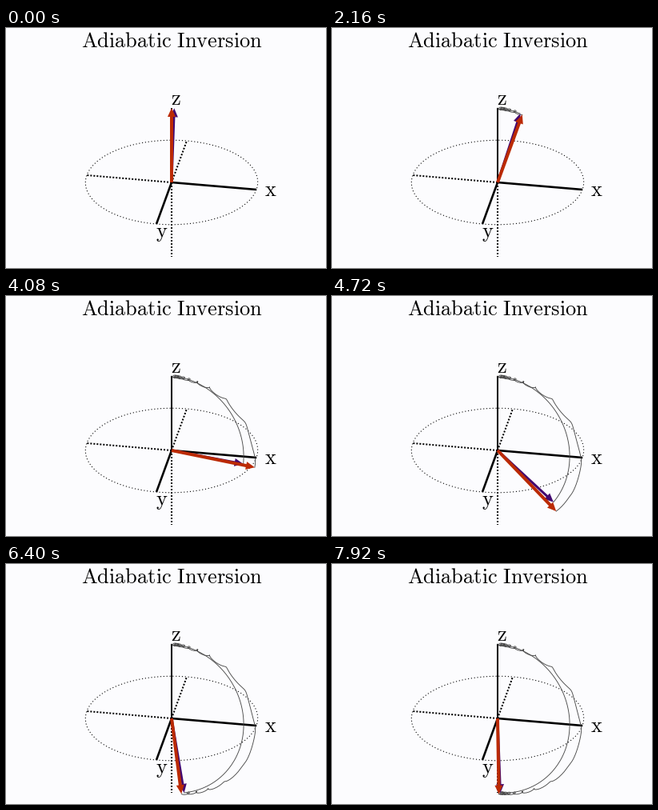
A matplotlib script for the animation above (7.96 s loop, 400 by 300 pixels).

```python
import numpy as np
import matplotlib.pyplot as plt
from matplotlib.animation import FuncAnimation
from matplotlib.patches import Polygon

W, H, DPI = 400, 300, 100
FRAMES, STEP = 199, 40
PX = 72 / DPI

ORIGIN = np.array([207, 193])
BASIS = np.array([[106, 9], [-19, 52], [0, -93]])  # screen x, y, z axes

SWEEP = 4.0    # half-width of the hyperbolic secant pulse
B1 = 0.85      # transverse field amplitude
OMEGA = 15.9   # precession rate, rad/s
SUBSTEPS = 20

RED, INDIGO, TRAIL = "#bb2a04", "#43086f", "#4a4a4a"


def project(v):
    return ORIGIN + np.asarray(v) @ BASIS


def field(frame):
    u = SWEEP * (2 * frame / FRAMES - 1)
    return np.array([B1 / np.cosh(u), 0, -np.tanh(u)])


def rotate(v, axis, angle):
    c, s = np.cos(angle), np.sin(angle)
    return v * c + np.cross(axis, v) * s + axis * (axis @ v) * (1 - c)


def precess():
    m = np.array([0.0, 0.0, 1.0])
    path = [m]
    dt = STEP / 1000 / SUBSTEPS
    for i in range(FRAMES - 1):
        for k in range(SUBSTEPS):
            b = field(i + (k + 0.5) / SUBSTEPS)
            size = np.linalg.norm(b)
            m = rotate(m, b / size, -OMEGA * size * dt)
        path.append(m)
    return np.array(path)


spin_path = project(precess())
field_path = project([field(i) for i in range(FRAMES)])

plt.rcParams["mathtext.fontset"] = "cm"
fig = plt.figure(figsize=(W / DPI, H / DPI), dpi=DPI, facecolor="#fcfcfe")
ax = fig.add_axes([0, 0, 1, 1])
ax.set_xlim(0, W)
ax.set_ylim(H, 0)
ax.axis("off")


def label(x, y, text, ha="left"):
    ax.text(x, y, rf"$\mathrm{{{text}}}$", fontsize=26.4 * PX,
            ha=ha, va="baseline", color="black")


def axis_line(v, width, style="-"):
    (x0, y0), (x1, y1) = ORIGIN, project(v)
    ax.plot([x0, x1], [y0, y1], color="black", lw=width * PX, ls=style,
            solid_capstyle="butt", zorder=2)


class Arrow:
    def __init__(self, color, width, z):
        self.shaft, = ax.plot([], [], color=color, lw=width * PX,
                              solid_capstyle="butt", zorder=z)
        self.head = ax.add_patch(Polygon(np.zeros((3, 2)), fc=color,
                                         lw=0, zorder=z))

    def point(self, tip, length=11, half=5):
        d = (tip - ORIGIN) / np.linalg.norm(tip - ORIGIN)
        n = np.array([-d[1], d[0]])
        base = tip - length * d
        self.shaft.set_data(*np.array([ORIGIN, base + d]).T)
        self.head.set_xy([tip, base + half * n, base - half * n])


label(207.5, 24, r"Adiabatic\ Inversion", "center")
label(323, 210, "x")
label(187, 262, "y")
label(206, 96, "z")

phi = np.linspace(0, 2 * np.pi, 361)
ring = project(np.column_stack([np.cos(phi), np.sin(phi), 0 * phi]))
ax.plot(*ring.T, color="black", lw=1.1 * PX, ls=(0, (1, 2.5)), zorder=1)

for v, width in zip(np.eye(3), (2.6, 2.6, 2)):
    axis_line(v, width)
    axis_line(-v, 2, (0, (1, 1)))

trails = [ax.plot([], [], color=TRAIL, lw=0.9 * PX, zorder=3)[0]
          for _ in range(2)]
field_arrow = Arrow(INDIGO, 3, 4)
spin_arrow = Arrow(RED, 4, 5)


def draw(i):
    for line, path in zip(trails, (field_path, spin_path)):
        line.set_data(*path[:i + 1].T)
    field_arrow.point(field_path[i])
    spin_arrow.point(spin_path[i])
    return (*trails, field_arrow.shaft, field_arrow.head,
            spin_arrow.shaft, spin_arrow.head)


anim = FuncAnimation(fig, draw, frames=FRAMES, interval=STEP,
                     repeat=True, repeat_delay=0)
plt.show()
```
